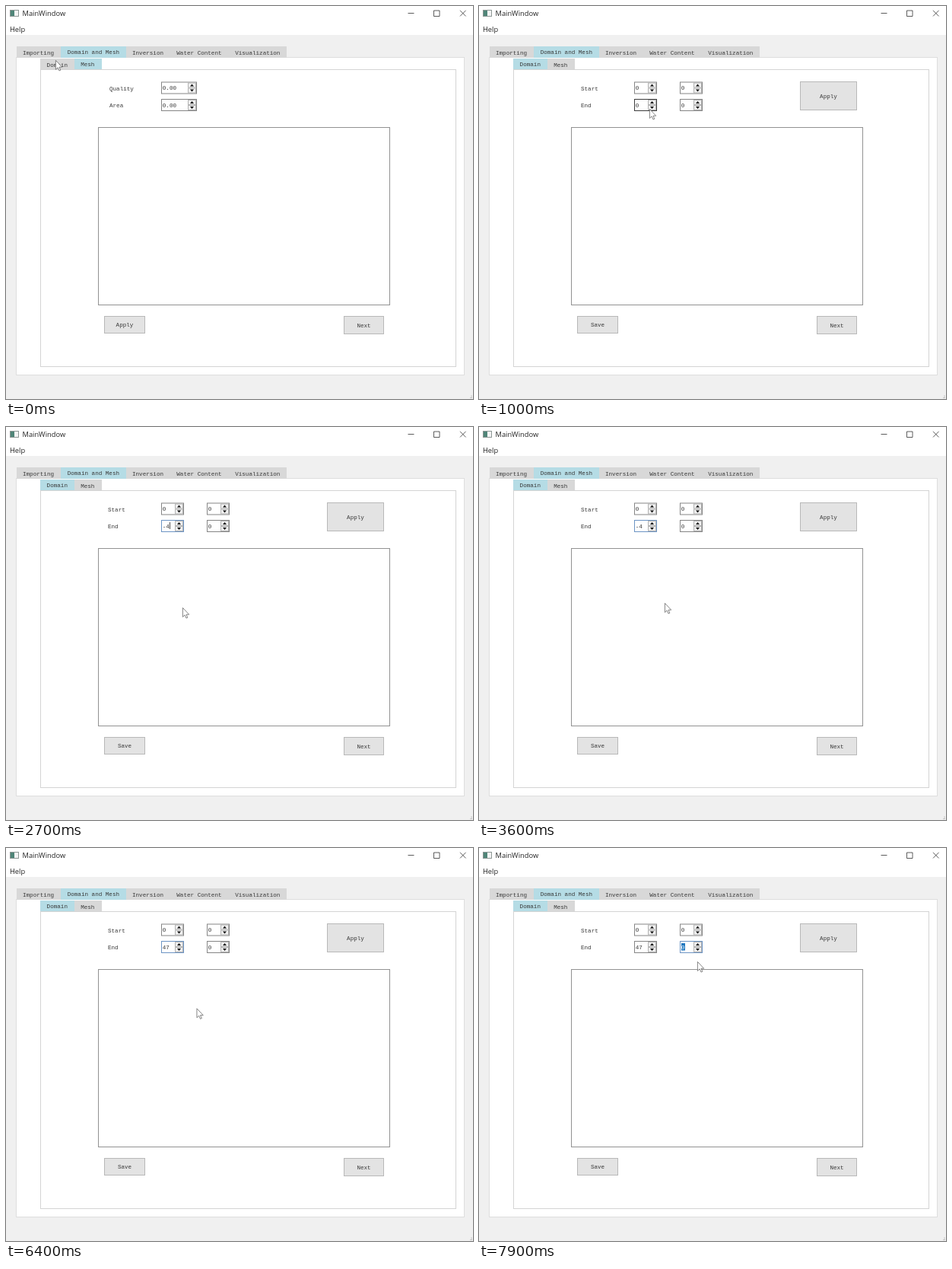
Recreate the animation shown at these times as an HTML page. Size 614 by 516 pixels, loop 8 s.

```html
<!DOCTYPE html>
<html lang="en">
<head>
<meta charset="utf-8">
<title>MainWindow</title>
<style>
  html, body { margin: 0; width: 100%; height: 100%; overflow: hidden; background: #f0f0f0; }
  svg { display: block; width: 614px; height: 516px; }
  text { font: 7.6px "Liberation Mono", monospace; fill: #383838; white-space: pre; }
  .ui { font: 9.3px "Open Sans", sans-serif; fill: #222; }
</style>
</head>
<body>
<svg id="stage" viewBox="0 0 614 516" xmlns="http://www.w3.org/2000/svg"></svg>
<script>
const LOOP = 8000, STEP = 100, CHAR = 4.56;
const NORMAL = '#858585', HOVER = '#3c3c3c', FOCUS = '#6c94c4';
const stage = document.getElementById('stage');

function add(parent, tag, attrs, content) {
  const node = document.createElementNS('http://www.w3.org/2000/svg', tag);
  set(node, attrs);
  if (content !== undefined) node.textContent = content;
  parent.append(node);
  return node;
}
function set(node, attrs) {
  for (const name in attrs) node.setAttribute(name, attrs[name]);
}
const show = (node, on) => set(node, { visibility: on ? 'inherit' : 'hidden' });
const group = parent => add(parent, 'g', {});
const fillRect = (parent, x, y, width, height, fill) =>
  add(parent, 'rect', { x, y, width, height, fill });
// Outlined box whose one-pixel border sits inside the given bounds.
const frame = (parent, x, y, width, height, fill, stroke) =>
  add(parent, 'rect', { x: x + .5, y: y + .5, width: width - 1, height: height - 1, fill, stroke });
const label = (parent, x, y, content) => add(parent, 'text', { x, y }, content);
const line = (parent, d, stroke, width = 1) =>
  add(parent, 'path', { d, stroke, fill: 'none', 'stroke-width': width });

function tab(parent, x, y, width, height, textX, title, active) {
  fillRect(parent, x, y, width, height, active ? '#b5dce5' : '#d8d8d8');
  label(parent, textX, y + (active ? 10.4 : 11.2), title);
}

function button(parent, x, y, width, height, title) {
  frame(parent, x, y, width, height, '#e3e3e3', '#b8b8b8');
  label(parent, x + (width - title.length * CHAR) / 2, y + height / 2 + 2.9, title);
}

function spinBox(parent, x, y, width, value) {
  const border = frame(parent, x, y, width, 16, '#fff', NORMAL);
  const bx = x + width - 12;
  frame(parent, bx, y + 1, 11, 7, '#f0f0f0', '#b4b4b4');
  frame(parent, bx, y + 8, 11, 7, '#f0f0f0', '#b4b4b4');
  add(parent, 'path', {
    d: `M${bx + 3} ${y + 6}h5l-2.5 -3zM${bx + 3} ${y + 10}h5l-2.5 3z`, fill: '#111'
  });
  const selection = fillRect(parent, x + 2, y + 3, 5, 9.5, '#1f77c0');
  const text = label(parent, x + 1.8, y + 10.9, value);
  const caret = fillRect(parent, x + 2, y + 3, .8, 9, '#222');
  show(selection, false);
  show(caret, false);
  return { x, border, selection, text, caret };
}

function drawWindow() {
  fillRect(stage, 0, 0, 614, 516, '#f0f0f0');
  fillRect(stage, 0, 0, 614, 38, '#fff');
  frame(stage, 5, 5, 12, 9, '#f4f4f4', '#8c9694');
  fillRect(stage, 6, 6, 5, 7, '#4f8578');
  set(label(stage, 21.5, 13.2, 'MainWindow'), { class: 'ui' });
  set(label(stage, 5, 33.6, 'Help'), { class: 'ui' });
  line(stage, 'M528.5 9.5h8', '#333', .8);
  line(stage, 'M562.5 6h7.5v7.5h-7.5z', '#333', .8);
  line(stage, 'M597 5.8l7.6 7.6m0 -7.6l-7.6 7.6', '#333', .8);
  line(stage, 'M612 511v4M610 514.5h3', '#c4c4c4', 1);

  frame(stage, 13, 67, 590, 418, '#fff', '#dedede');
  tab(stage, 14, 53, 58, 15, 22, 'Importing');
  tab(stage, 157, 53, 59, 15, 166, 'Inversion');
  tab(stage, 216, 53, 76, 15, 224.3, 'Water Content');
  tab(stage, 292, 53, 77, 15, 301.2, 'Visualization');
  tab(stage, 72, 53, 86, 15, 80.7, 'Domain and Mesh', true);

  frame(stage, 45, 83, 547, 391, '#fff', '#d4d4d4');
  frame(stage, 121, 159, 384, 234, '#fff', '#929292');
  button(stage, 444, 407, 53, 24, 'Next');
}

function innerTabs(parent, domainActive) {
  tab(parent, 45, 69, 45, 14, 53.6, 'Domain', domainActive);
  tab(parent, 90, 69, 36, 14, 98.2, 'Mesh', !domainActive);
}

function drawMeshPage() {
  const page = group(stage);
  innerTabs(page, false);
  label(page, 136, 110.8, 'Quality');
  label(page, 136, 133.3, 'Area');
  spinBox(page, 204, 99.5, 47, '0.00');
  spinBox(page, 204, 122, 47, '0.00');
  button(page, 129, 407, 54, 23, 'Apply');
  return page;
}

function drawDomainPage() {
  const page = group(stage);
  innerTabs(page, true);
  label(page, 134, 110.8, 'Start');
  label(page, 134, 133.3, 'End');
  const start = spinBox(page, 204, 99.5, 30, '0');
  spinBox(page, 264, 99.5, 30, '0');
  const endX = spinBox(page, 204, 122, 30, '0');
  const endY = spinBox(page, 264, 122, 30, '0');
  button(page, 422, 99, 75, 38, 'Apply');
  button(page, 129, 407, 54, 23, 'Save');
  return { page, start, endX, endY };
}

drawWindow();
const mesh = drawMeshPage();
const domain = drawDomainPage();
const arrow = add(stage, 'path', {
  d: 'M.4 .4V12.4L3.1 9.8L5 14L6.8 13.2L5 9.2H8.7Z',
  fill: '#fff', stroke: '#666', 'stroke-width': .8
});
const beam = line(stage, 'M-2.5 -5.5h2l.5 .5l.5 -.5h2M0 -5V5M-2.5 5.5h2l.5 -.5l.5 .5h2', '#777', .9);

// Each entry: start time, then the state that holds from there on.
const endXEdits = [
  [0, '0', ''], [1500, '0', 'select'], [2300, '-', 'caret'], [2700, '-4', 'caret'],
  [3300, '-4', ''], [4000, '-4', 'caret'], [4500, '-4', ''], [4900, '-', 'caret'],
  [5000, '', 'caret'], [5700, '4', 'caret'], [5900, '47', 'caret'], [6400, '47', '']
];
const endYEdits = [[0, '0', ''], [7100, '0', 'caret'], [7300, '0', 'select']];
const startBorder = [[0, NORMAL], [500, HOVER], [900, NORMAL]];
const endXBorder = [[0, NORMAL], [900, HOVER], [2200, FOCUS], [7100, NORMAL]];
const endYBorder = [[0, NORMAL], [6800, HOVER], [7800, FOCUS]];

const pointer = [
  [0, 65, 71], [200, 65, 72], [500, 212, 107], [700, 213, 109], [1000, 224, 135],
  [1200, 224, 134], [1400, 213, 130], [1600, 213, 130], [1900, 232, 237], [3200, 232, 237],
  [3600, 244, 231], [6200, 244, 231], [6900, 277, 127], [7400, 277, 127], [7600, 287, 149]
];

const current = (track, t) => track.findLast(entry => entry[0] <= t);

function pointerAt(t) {
  const next = pointer.findIndex(p => p[0] > t);
  if (next < 0) return pointer.at(-1).slice(1);
  const [t0, x0, y0] = pointer[next - 1], [t1, x1, y1] = pointer[next];
  const u = (t - t0) / (t1 - t0), k = u * u * (3 - 2 * u);
  return [x0 + (x1 - x0) * k, y0 + (y1 - y0) * k];
}

function overTextField(x, y) {
  const column = (x >= 204 && x < 222) || (x >= 264 && x < 282);
  const row = (y >= 100 && y < 115) || (y >= 122 && y < 138);
  return column && row;
}

function updateSpin(spin, edits, borders, t) {
  const [, value, mode] = current(edits, t);
  spin.text.textContent = value;
  set(spin.text, { style: mode === 'select' ? 'fill:#fff' : '' });
  set(spin.caret, { x: spin.x + 2 + value.length * CHAR });
  show(spin.caret, mode === 'caret');
  show(spin.selection, mode === 'select');
  set(spin.border, { stroke: current(borders, t)[1] });
}

function render(t) {
  const onDomain = t >= 200;
  set(mesh, { visibility: onDomain ? 'hidden' : 'visible' });
  set(domain.page, { visibility: onDomain ? 'visible' : 'hidden' });
  set(domain.start.border, { stroke: current(startBorder, t)[1] });
  updateSpin(domain.endX, endXEdits, endXBorder, t);
  updateSpin(domain.endY, endYEdits, endYBorder, t);

  const [x, y] = pointerAt(t);
  const typing = onDomain && overTextField(x, y);
  set(arrow, { transform: `translate(${x} ${y})` });
  set(beam, { transform: `translate(${x} ${y})` });
  show(arrow, !typing);
  show(beam, typing);
}

const began = performance.now();
function tick() {
  const t = (performance.now() - began) % LOOP;
  render(Math.floor(t / STEP) * STEP);
  requestAnimationFrame(tick);
}
tick();
</script>
</body>
</html>
```
